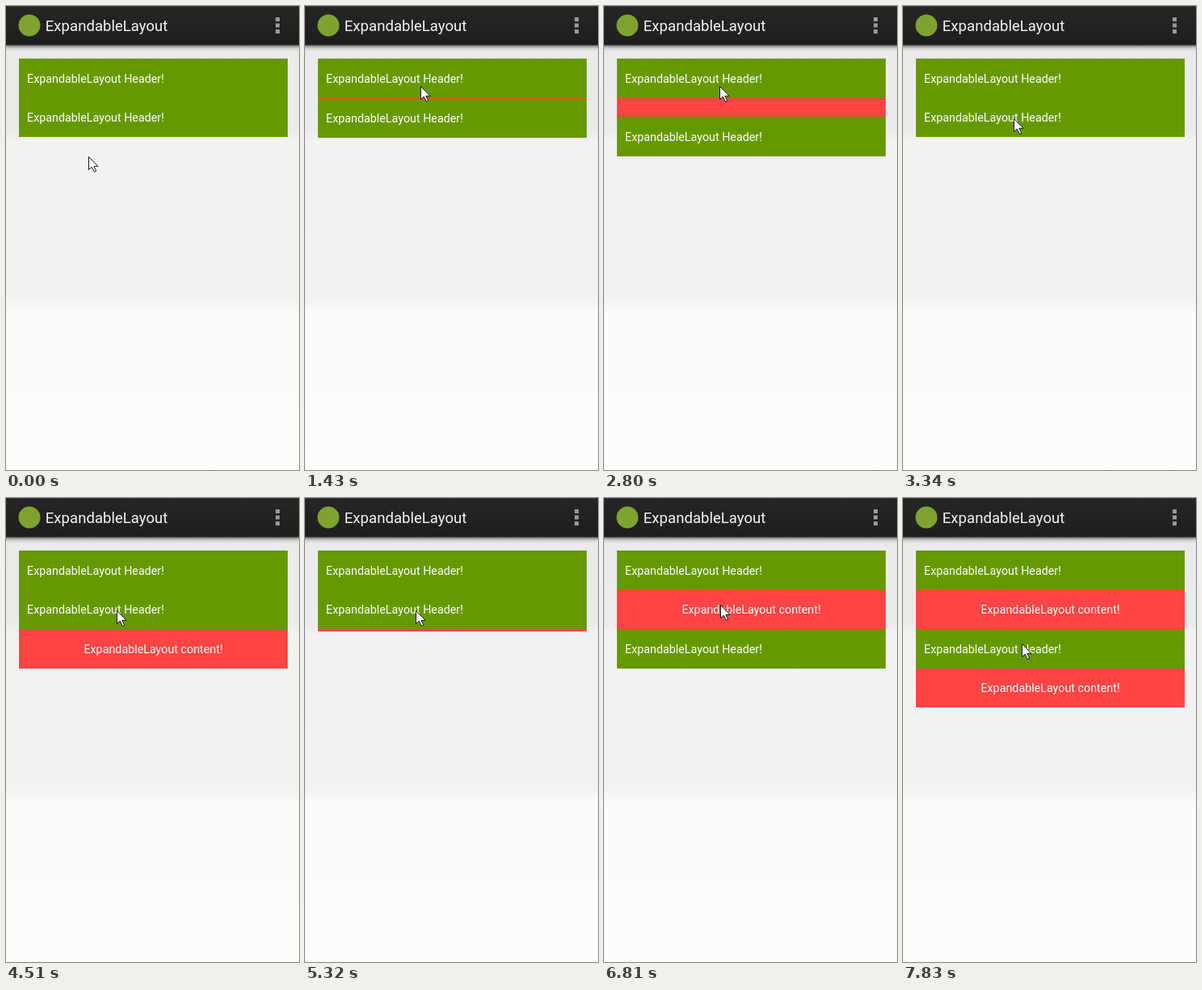
Write an HTML page that moves like this. It is 363 by 574 pixels and loops after 8 s.

```html
<!DOCTYPE html>
<html lang="en">
<head>
<meta charset="utf-8">
<title>ExpandableLayout</title>
<style>
  html, body { margin: 0; width: 100%; height: 100%; overflow: hidden; background: #fbfbfb; }
  svg { display: block; }
  text { font: 14.3px Roboto, sans-serif; fill: #fff; }
  .title { font-size: 18.6px; fill: #f3f3f3; }
  .content text { text-anchor: middle; }
</style>
</head>
<body>
<svg id="stage" width="363" height="574" viewBox="0 0 363 574">
  <defs>
    <linearGradient id="page" gradientUnits="userSpaceOnUse" x1="0" y1="0" x2="0" y2="574">
      <stop offset="0" stop-color="#eaeaea"/>
      <stop offset=".27" stop-color="#ebebeb"/>
      <stop offset=".29" stop-color="#f2f2f2"/>
      <stop offset=".63" stop-color="#f3f3f3"/>
      <stop offset=".66" stop-color="#fafafa"/>
      <stop offset="1" stop-color="#fcfcfc"/>
    </linearGradient>
    <linearGradient id="bar" x2="0" y2="1">
      <stop stop-color="#262626"/>
      <stop offset="1" stop-color="#1e1e1e"/>
    </linearGradient>
    <linearGradient id="shade" x2="0" y2="1">
      <stop stop-opacity=".7"/>
      <stop offset=".3" stop-opacity=".27"/>
      <stop offset=".6" stop-opacity=".1"/>
      <stop offset="1" stop-opacity="0"/>
    </linearGradient>
  </defs>
  <rect width="363" height="574" fill="url(#page)"/>
  <rect y="48" width="363" height="8" fill="url(#shade)"/>
  <rect width="363" height="48" fill="url(#bar)"/>
  <rect width="363" height="1" fill="#3c3c3c"/>
  <circle cx="29" cy="24" r="13.5" fill="#7fa32f"/>
  <text class="title" x="48.8" y="31">ExpandableLayout</text>
  <path d="M334 14h5v5h-5zm0 7.5h5v5h-5zm0 7.5h5v5h-5z" fill="#999"/>
  <g id="panels"></g>
  <path id="cursor" d="M.5 .5V16.5L4.3 13.2 7.3 19.3 9.8 18.2 6.9 12.3H12Z" fill="#fff" stroke="#15152a"/>
</svg>
<script>
const LOOP = 8000, ROW = 48.6, TOP = 65, PAD = 13, BASE = 29.6, SLIDE = 200;
const STEP = 139.5, LEAD = 35; // the screen refreshes about seven times a second

// When each panel opens, closes, opens...
const toggles = [[1375, 2688, 6173], [4018, 5133, 7520]];

// Pointer moves between rests
const start = [102, 186];
const moves = [
  { from: 140, to: 950, at: [143, 99] },
  { from: 2990, to: 3340, at: [137, 139] },
  { from: 5580, to: 5960, at: [141, 95] },
  { from: 6660, to: 7040, at: [147, 180] }
];

const $ = id => document.getElementById(id);
const ease = p => (1 - Math.cos(Math.PI * Math.min(1, Math.max(0, p)))) / 2;

const panels = toggles.map(times => {
  const g = document.createElementNS('http://www.w3.org/2000/svg', 'g');
  g.innerHTML = `<g class="header"><rect x="16" width="333" fill="#690"/>
      <text x="26">ExpandableLayout Header!</text></g>
    <g class="content"><rect x="16" width="333" fill="#f44"/>
      <svg x="16" width="333"><text x="166.5">ExpandableLayout content!</text></svg></g>`;
  $('panels').append(g);
  const [box, fill] = g.querySelectorAll('rect');
  const [label, text] = g.querySelectorAll('text');
  return { times, box, fill, label, text, clip: g.querySelector('svg') };
});

function span(el, y, h) {
  el.setAttribute('y', y);
  el.setAttribute('height', Math.max(0, h));
}

const pointer = t => moves.reduce((pos, { from, to, at }) => {
  const p = ease((t - from) / (to - from));
  return pos.map((v, i) => v + (at[i] - v) * p);
}, start).map(Math.round);

const openness = (times, t) =>
  times.reduce((sum, s, i) => sum + (i % 2 ? -1 : 1) * ease((t - s) / SLIDE), 0);

function draw(t) {
  let y = TOP;
  for (const { times, box, fill, label, text, clip } of panels) {
    const h = ROW * openness(times, t);
    const top = Math.round(y), mid = Math.round(y + ROW), end = Math.round(y + ROW + h);
    span(box, top, mid - top);
    label.setAttribute('y', Math.round(y + BASE));
    span(fill, mid, end - mid);
    span(clip, mid + PAD, end - mid - 2 * PAD);
    // content text stays centred in the part that is open
    text.setAttribute('y', Math.round(y + BASE + (ROW + h) / 2) - mid - PAD);
    clip.style.display = end - mid > 2 * PAD ? '' : 'none';
    y += ROW + h;
  }
  $('cursor').setAttribute('transform', `translate(${pointer(t)})`);
}

const begin = performance.now();
function frame() {
  const t = (performance.now() - begin) % LOOP;
  draw(Math.floor((t + LEAD) / STEP) * STEP);
  requestAnimationFrame(frame);
}
frame();
</script>
</body>
</html>
```
